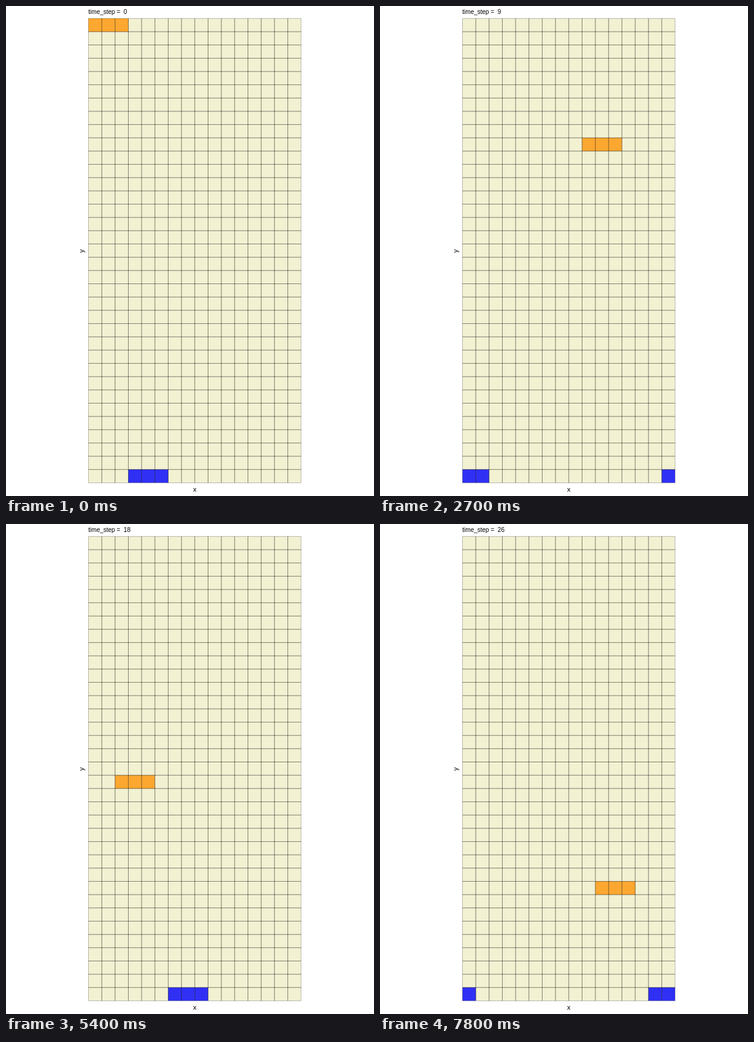
Animation, 600 px wide and 800 px high, one loop 8000 ms. Source, as an HTML page:

```html
<!DOCTYPE html>
<html lang="en">
<head>
<meta charset="utf-8">
<title>Grid world</title>
<style>
  html, body { margin: 0; width: 100%; height: 100%; overflow: hidden; background: #fff; }
  svg { display: block; width: 600px; height: 800px; }
  text { font: 10px "Liberation Sans", Arial, sans-serif; white-space: pre; }
  .axis { font-size: 11px; text-anchor: middle; }
  #grid rect { fill: none; stroke: #000; stroke-opacity: .28; stroke-width: .95; }
</style>
</head>
<body>
<svg viewBox="0 0 600 800">
  <text id="title" x="134.3" y="13"></text>
  <text class="axis" x="307.8" y="793">x</text>
  <text class="axis" transform="translate(126.5 400) rotate(-90)">y</text>
  <g id="fills"></g>
  <g id="grid"></g>
</svg>
<script>
const COLS = 16, ROWS = 35, CELL = 21.66, LEFT = 134.5, TOP = 20.3;
const STEP = 300, LOOP = 8000, WIDTH = 3;
const $ = id => document.getElementById(id);

function addRect(parent, attrs) {
  const r = document.createElementNS('http://www.w3.org/2000/svg', 'rect');
  for (const k in attrs) r.setAttribute(k, attrs[k]);
  return parent.appendChild(r);
}

const addCell = (parent, fill) => addRect(parent, { width: CELL, height: CELL, fill });

function place(cell, col, row) {
  cell.setAttribute('x', LEFT + (col + COLS) % COLS * CELL);
  cell.setAttribute('y', TOP + row * CELL);
}

addRect($('fills'), { x: LEFT, y: TOP, width: COLS * CELL, height: ROWS * CELL, fill: '#f2f1d2' });
const makeBlock = fill => Array.from({ length: WIDTH }, () => addCell($('fills'), fill));
const block = makeBlock('#fca730');
const agent = makeBlock('#3030f5');

for (let row = 0; row < ROWS; row++)
  for (let col = 0; col < COLS; col++) place(addCell($('grid'), 'none'), col, row);

// The agent waits one step, goes left four, rests until step 9, then keeps going left.
const agentCol = n => 3 - Math.min(Math.max(n - 1, 0), 4) - Math.max(n - 9, 0);

let shown = -1;
function draw(now) {
  const n = Math.floor(now % LOOP / STEP);
  if (n !== shown) {
    shown = n;
    $('title').textContent = 'time_step =  ' + n;
    block.forEach((c, i) => place(c, n + i, n));
    agent.forEach((c, i) => place(c, (agentCol(n) + i) % COLS, ROWS - 1));
  }
  requestAnimationFrame(draw);
}
draw(0);
</script>
</body>
</html>
```
